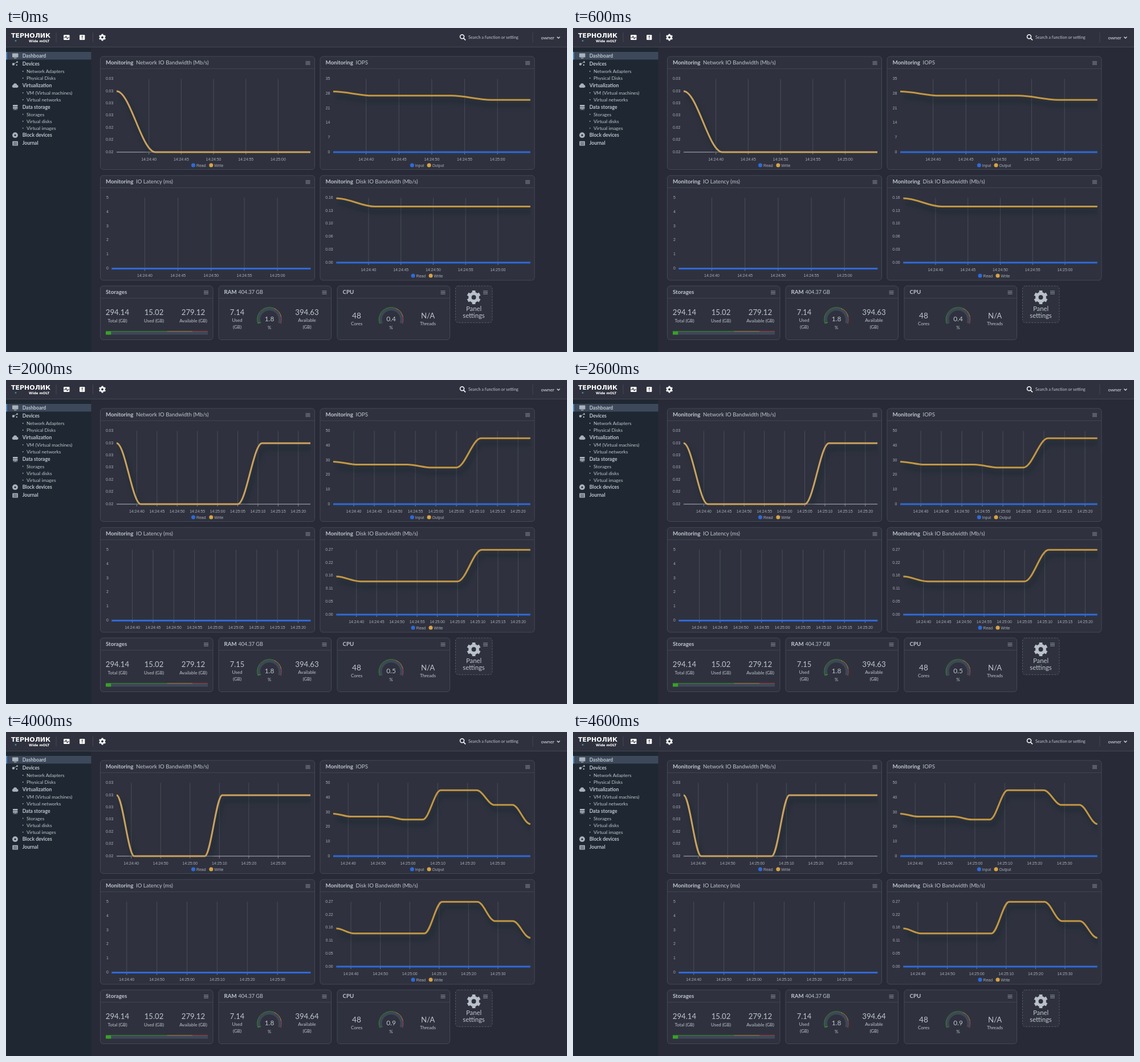
Recreate the animation shown at these times as an HTML page. Size 984x569 px, loop 5000 ms.

```html
<!DOCTYPE html>
<html lang="en">
<head>
<meta charset="utf-8">
<title>Dashboard</title>
<style>
html, body { margin: 0; height: 100%; overflow: hidden; background: #282b37; }
svg { display: block; width: 100vw; height: 100vh; }
text { font-family: Lato, "Open Sans", sans-serif; fill: #bfc5cd; white-space: pre; }
.axis text { font-family: "Liberation Sans", Arial, sans-serif; font-size: 6.9px; fill: #a9aeb7; }
.logo { font-family: "DejaVu Sans", sans-serif; font-weight: 700; fill: #fff; }
.curve { fill: none; stroke-width: 3; filter: drop-shadow(4px 9px 5px #12242b); }
</style>
</head>
<body>
<svg viewBox="0 0 984 569"><g id="fixed"></g><g id="live"></g></svg>
<script>
const BLUE = '#2e6ada', GOLD = '#d9a441', ICON = '#a9b1ba';
const STEP = 6, START = 35; // seconds after 14:24:00

const rect = (x, y, w, h, fill, more = '') =>
  `<rect x="${x}" y="${y}" width="${w}" height="${h}" fill="${fill}" ${more}/>`;
const line = (x1, y1, x2, y2, stroke, w = 1) =>
  `<path d="M${x1} ${y1}L${x2} ${y2}" stroke="${stroke}" stroke-width="${w}"/>`;
const path = (d, stroke, w, more = '') =>
  `<path d="${d}" fill="none" stroke="${stroke}" stroke-width="${w}" ${more}/>`;
const dot = (x, y, r, fill) => `<circle cx="${x}" cy="${y}" r="${r}" fill="${fill}"/>`;
const text = (x, y, s, size, more = '') =>
  `<text x="${x}" y="${y}" font-size="${size}" ${more}>${s}</text>`;
const mid = (x, y, s, size) => text(x, y, s, size, 'text-anchor="middle"');
const bold = (x, y, s, size, more = '') => text(x, y, s, size, 'font-weight="700" ' + more);

const menu = (x, y) =>
  [-2.5, 0, 2.5].map(d => line(x - 4, y + d, x + 4, y + d, '#8f959f')).join('');

function gear(x, y, r, fill) {
  let s = `<circle cx="${x}" cy="${y}" r="${r * .56}" fill="none" stroke="${fill}" stroke-width="${r * .46}"/>`;
  for (let a = 0; a < 360; a += 60)
    s += rect(x - r * .24, y - r, r * .48, r * .4, fill, `transform="rotate(${a} ${x} ${y})"`);
  return s;
}

function panel(x, y, w, h, name, label = '', labelX = 0, size = 9.6) {
  return rect(x, y, w, h, '#2f323e', 'rx="5" stroke="#454955"') +
    line(x, y + 21.5, x + w, y + 21.5, '#414551') +
    bold(x + 9.5, y + 14.3, name, 9.7) +
    text(x + labelX, y + 14.3, label, size) + menu(x + w - 12, y + 11.5);
}

const charts = [
  { l: 194, r: 534, t: 89.5, b: 218, min: () => .02, max: () => .0302, ticks: 6, digits: 2,
    data: [1, 0, 0, 0, 0, 0, 1, 1, 1, 1, 1, 1].map(v => .02 + v * .0085),
    color: '#cca25e', legend: ['Read', 328.5, 'Write', 359.8], base: true },
  { l: 574, r: 919.7, t: 89.5, b: 218, min: () => 0, max: i => i ? 50 : 35, ticks: 5, digits: 0,
    data: [29, 27, 27, 27, 25, 25, 45, 45, 45, 35, 35, 22],
    color: '#c39742', legend: ['Input', 712.3, 'Output', 742] },
  { l: 185.3, r: 534.3, t: 298, b: 422.5, min: () => 0, max: () => 5, ticks: 5, digits: 0 },
  { l: 579.2, r: 919.7, t: 298.3, b: 412, min: () => 0, max: i => i ? .27 : .16, ticks: 5, digits: 2,
    data: [.159, .1385, .1385, .1385, .1385, .1385, .27, .27, .27, .19, .19, .12],
    color: '#c39742', legend: ['Read', 714, 'Write', 745] }
];
const labelRight = [188.3, 568.3, 179.8, 573.7];
const ends = [65, 77, 83, 95, 101];
const ram = [['7.14', '394.63'], ['7.15', '394.63'], ['7.15', '394.63'], ['7.16', '394.62'], ['7.14', '394.64']];
const cpu = [.4, .5, .5, 1.1, .9];

const clock = t => `14:${24 + (t / 60 | 0)}:${String(t % 60).padStart(2, '0')}`;

function chart(c, k, i) {
  const end = ends[i], min = c.min(i), max = c.max(i);
  const X = t => c.l + (t - START) / (end - START) * (c.r - c.l);
  const Y = v => c.b - (v - min) / (max - min) * (c.b - c.t);
  const gap = i < 3 ? 5 : 10;
  let s = '<g class="axis">';
  for (let t = 40; t <= end - 2; t += gap) {
    s += line(X(t), c.t, X(t), c.b, '#4b4e59') + line(X(t), c.b, X(t), c.b + 4, '#7c808a');
    s += mid(X(t), c.b + 14.5, clock(t), 6.9);
  }
  for (let n = 0; n <= c.ticks; n++) {
    const v = min + (max - min) * n / c.ticks;
    s += text(labelRight[k], Y(v) + 1.7, v.toFixed(c.digits), 6.9, 'text-anchor="end"');
  }
  if (c.legend) {
    const [a, ax, b, bx] = c.legend, y = c.b + 23;
    s += dot(ax, y, 3.5, BLUE) + text(ax + 5.5, y + 2.5, a, 6.9) +
      dot(bx, y, 3.5, GOLD) + text(bx + 5.5, y + 2.5, b, 6.9);
  }
  s += '</g>';
  s += c.base ? line(c.l, c.b, c.r, c.b, '#b4b7bd') : line(c.l, c.b, c.r, c.b, BLUE, 3);
  if (!c.data) return s;
  // horizontal tangents at every sample
  let d = `M${c.l} ${Y(c.data[0])}`;
  for (let n = 1; START + n * STEP <= end; n++) {
    const x0 = X(START + (n - 1) * STEP), x1 = X(START + n * STEP), h = (x1 - x0) * .35;
    const y0 = Y(c.data[n - 1]), y1 = Y(c.data[n]);
    d += `C${x0 + h} ${y0} ${x1 - h} ${y1} ${x1} ${y1}`;
  }
  return s + `<clipPath id="clip${k}">${rect(c.l, c.t - 3, c.r - c.l + 1, c.b - c.t + 5, '#000')}</clipPath>` +
    `<g clip-path="url(#clip${k})"><path class="curve" d="${d}" stroke="${c.color}"/></g>`;
}

function gauge(x, value) {
  const y = 512, cos = Math.cos(Math.PI / 9), sin = Math.sin(Math.PI / 9);
  const arc = (r, w, color, from, to) => path(
    `M${x - r * cos} ${y + r * sin}A${r} ${r} 0 1 1 ${x + r * cos} ${y + r * sin}`,
    color, w, `pathLength="100" stroke-dasharray="${to - from} 200" stroke-dashoffset="${-from}"`);
  return arc(18.3, 4.6, '#3e4757', 0, 100) + arc(18.3, 4.6, '#37a324', 0, value) +
    arc(21.3, 1, '#37902b', 0, 60) + arc(21.3, 1, '#b5843c', 60, 85) + arc(21.3, 1, '#b03c3f', 85, 100) +
    mid(x, 515, value.toFixed(1), 11.8) + mid(x, 529, '%', 8);
}

function header() {
  return rect(0, 0, 984, 33, '#2f323e') + line(0, 33.5, 984, 33.5, '#434753') +
    text(9, 16.5, 'ТЕРНОЛИК', 11, 'class="logo"') + text(40, 24.5, 'Wide mOLT', 5.8, 'class="logo"') +
    dot(17, 22.5, 1.3, '#3c9cc4') +
    [88, 152.5, 924].map(x => line(x, 8, x, 25, '#454955')).join('') +
    rect(101, 12, 10.5, 9, '#fff', 'rx="1.2"') +
    path('M101.5 17H104L105.3 14.3L107.3 18.8L108.5 17H111', '#2f323e', 1.1) +
    rect(129, 12, 9.3, 9, '#fff', 'rx="1.2"') +
    line(133.6, 13.3, 133.6, 17.3, '#2f323e', 1.3) + line(133.6, 18.4, 133.6, 19.7, '#2f323e', 1.3) +
    gear(169, 16.5, 6, '#fff') +
    path('M802.6 18L806 21.4', '#fff', 1.7) +
    '<circle cx="800" cy="15.3" r="3.5" fill="none" stroke="#fff" stroke-width="1.5"/>' +
    text(811, 19.4, 'Search a function or setting', 7.3) +
    text(938.5, 19.8, 'owner', 8.4, 'style="fill:#e3e6ea"') +
    path('M966.5 15.5L969 18L971.5 15.5', '#d5d9de', 1.3);
}

function sidebar() {
  const heads = [['Dashboard', 51.6], ['Devices', 65.6], ['Virtualization', 103.6],
    ['Data storage', 141.6], ['Block devices', 191.4], ['Journal', 205.2]];
  const items = [['Network Adapters', 79], ['Physical Disks', 91], ['VM (Virtual machines)', 116.8],
    ['Virtual networks', 128.9], ['Storages', 154.6], ['Virtual disks', 166.7], ['Virtual images', 178.8]];
  let s = rect(0, 34, 149.5, 535, '#1f2832') + rect(0, 42, 149.5, 13.5, '#3d495b') +
    rect(0, 42, 2, 13.5, '#5187c4');
  for (const [name, y] of heads) s += bold(28.7, y, name, 8.6);
  for (const [name, y] of items) s += dot(29.7, y - 3, .9, ICON) + text(36, y, name, 8.3);
  s += rect(11, 44.5, 10.5, 7, ICON, 'rx="1"') + rect(14, 52.3, 4.5, 1.2, ICON);
  s += dot(13, 63.5, 2.2, ICON) + dot(19.5, 59.7, 1.5, ICON) + dot(18.8, 65, 1.2, ICON) +
    line(13, 63.5, 19.5, 59.7, ICON, .8);
  s += dot(13.3, 102.3, 2.5, ICON) + dot(16, 100.5, 3.2, ICON) + dot(19.2, 102.4, 2.4, ICON) +
    rect(13, 102, 6.5, 2.8, ICON);
  s += rect(12, 135, 8.5, 3, ICON, 'rx=".6"') + rect(12, 138.8, 8.5, 3, ICON, 'rx=".6"') +
    line(16.2, 141, 16.2, 143.8, ICON) + line(12.5, 143.3, 20, 143.3, ICON, .8);
  s += dot(16, 188.2, 4.9, ICON) + dot(16, 188.2, 1.5, '#1f2832');
  s += rect(11.3, 198.7, 9.7, 8, ICON, 'rx="1"');
  for (const y of [201, 203, 205]) s += line(13, y, 19.5, y, '#1f2832', .7);
  return s;
}

function fixed() {
  let s = header() + sidebar();
  s += panel(165.5, 50, 376, 198.5, 'Monitoring', 'Network IO Bandwidth (Mb/s)', 62.5);
  s += panel(551, 50, 376, 198.5, 'Monitoring', 'IOPS', 62.5);
  s += panel(165.5, 259, 376, 184, 'Monitoring', 'IO Latency (ms)', 62.5);
  s += panel(551, 259, 376, 184, 'Monitoring', 'Disk IO Bandwidth (Mb/s)', 62.5);
  s += panel(165.5, 453, 197.5, 94.5, 'Storages');
  s += panel(373, 453, 197.5, 94.5, 'RAM', '404.37 GB', 34.5, 9.1);
  s += panel(581, 453, 197.5, 94.5, 'CPU');
  for (const [x, n, label] of [[195.5, '294.14', 'Total'], [259.5, '15.02', 'Used'], [328.5, '279.12', 'Available']])
    s += mid(x, 504, n, 13.2) + mid(x, 516.5, label + ' (GB)', 8);
  s += rect(175, 533, 179, 5.5, '#3e4757') + rect(175, 533, 9.2, 5.5, '#37a324');
  s += line(175, 532.8, 282.4, 532.8, '#37902b') + line(282.4, 532.8, 327, 532.8, '#b5843c') +
    line(327, 532.8, 354, 532.8, '#b03c3f');
  for (const [x, label] of [[405.5, 'Used'], [528, 'Available']])
    s += mid(x, 516.3, label, 8) + mid(x, 527.6, '(GB)', 8);
  s += mid(615, 509.5, '48', 13.6) + mid(615, 521.7, 'Cores', 8);
  s += mid(740, 509.5, 'N/A', 13.2) + mid(740, 521.7, 'Threads', 8);
  s += rect(788.5, 453, 64.5, 64.5, '#2f323e', 'rx="5" stroke="#555a66" stroke-dasharray="3 2"');
  s += gear(820.5, 473, 12, '#b9c0c9') + menu(841, 464.5);
  return s + mid(820.5, 497, 'Panel', 11.3) + mid(820.5, 509, 'settings', 11.3);
}

function live(i) {
  return charts.map((c, k) => chart(c, k, i)).join('') +
    mid(405.5, 503.5, ram[i][0], 12.8) + mid(528, 503.5, ram[i][1], 13.2) +
    gauge(462, 1.8) + gauge(675.5, cpu[i]);
}

const $ = id => document.getElementById(id);
$('fixed').innerHTML = fixed();
let shown = -1;
function tick() {
  const i = Math.floor(performance.now() % 5000 / 1000);
  if (i !== shown) $('live').innerHTML = live(shown = i);
  requestAnimationFrame(tick);
}
tick();
</script>
</body>
</html>
```
